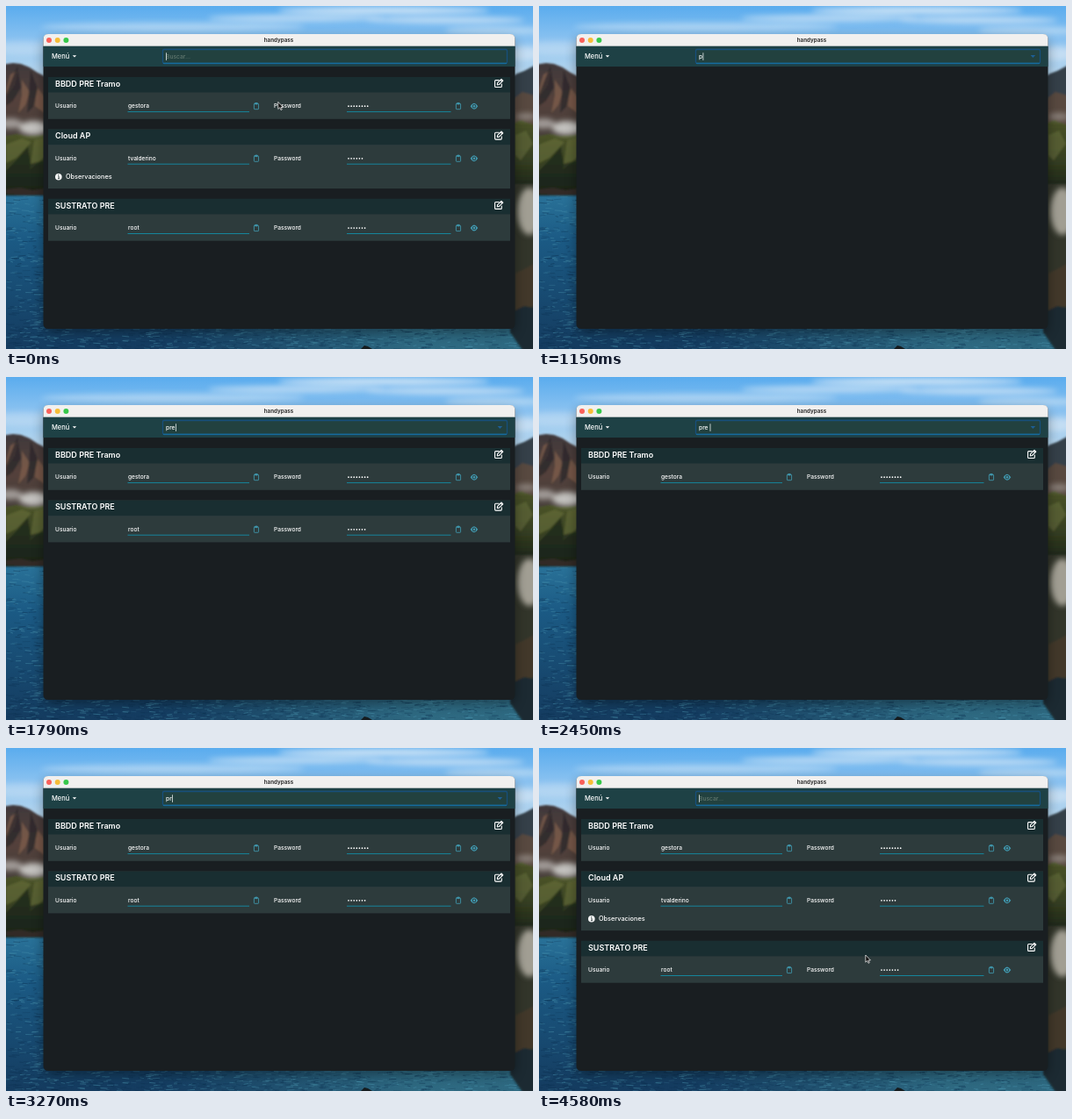
Write an HTML page that moves like this. It is 600 by 391 pixels and loops after 4.61 s.

```html
<!DOCTYPE html>
<html lang="es">
<head>
<meta charset="utf-8">
<title>handypass</title>
<style>
  html, body { margin: 0; width: 100%; height: 100%; overflow: hidden; background: #17191c; }
  svg { display: block; width: 100vw; height: 100vh; font-family: Inter, "Open Sans", sans-serif; }
  text { fill: #fff; white-space: pre; }
  .title { font-size: 9px; font-weight: 600; }
  .label { font-size: 6.6px; font-weight: 500; }
  .line { stroke: #16859b; stroke-width: 1; }
  .icon { fill: none; stroke: #419bb2; stroke-width: .85; stroke-linejoin: round; stroke-linecap: round; }
  .white { stroke: #fff; stroke-width: 1.1; }
</style>
</head>
<body>
<svg viewBox="0 0 600 391" preserveAspectRatio="none">
  <defs>
    <linearGradient id="sky" x2="0" y2="1">
      <stop stop-color="#5aacee"/><stop offset=".16" stop-color="#86c0f0"/><stop offset=".35" stop-color="#b6d6ee"/>
    </linearGradient>
    <linearGradient id="sea" x2="0" y2="1">
      <stop stop-color="#2a7399"/><stop offset=".3" stop-color="#1b5a84"/><stop offset="1" stop-color="#143b5f"/>
    </linearGradient>
    <linearGradient id="shine">
      <stop offset=".3" stop-color="#3f8797" stop-opacity="0"/><stop offset=".78" stop-color="#3f8797" stop-opacity=".6"/>
    </linearGradient>
    <linearGradient id="brown" x2="0" y2="1">
      <stop stop-color="#3f383b"/><stop offset=".5" stop-color="#54413a"/><stop offset="1" stop-color="#48403b"/>
    </linearGradient>
    <linearGradient id="green" x2="0" y2="1">
      <stop stop-color="#4a5329"/><stop offset=".55" stop-color="#363f21"/><stop offset="1" stop-color="#1a2219"/>
    </linearGradient>
    <filter id="soft" x="-50%" y="-50%" width="200%" height="200%"><feGaussianBlur stdDeviation="3"/></filter>
    <filter id="blend"><feGaussianBlur stdDeviation=".9"/></filter>
    <filter id="haze" x="-20%" y="-20%" width="140%" height="140%"><feGaussianBlur stdDeviation="7"/></filter>

    <g id="clip" class="icon">
      <rect x="-2.6" y="-2.9" width="5.2" height="6.4" rx=".7"/>
      <path d="M-1.2 -2.6V-3.7H1.2V-2.6Z" fill="#419bb2"/>
    </g>
    <g id="eye">
      <path d="M-4.3 0Q0 -7 4.3 0Q0 7 -4.3 0Z" fill="#419bb2"/>
      <circle r="2.2" fill="#2d3b3c"/>
      <circle r="1.3" fill="#419bb2"/>
    </g>
    <g id="edit" class="icon white">
      <path d="M.2 -3.5H-3.4Q-4.4 -3.5 -4.400 -2.500V3.400Q-4.400 4.400 -3.400 4.400H2.300Q3.300 4.400 3.300 3.400V1"/>
      <path d="M-1.700 1.800L-1.400 -.4L3 -4.700L4.800 -2.900L.4 1.400Z M2 -3.800L3.800 -2"/>
    </g>
  </defs>

  <g id="landscape">
    <rect width="600" height="220" fill="url(#sky)"/>
    <g fill="#f1f4f8" filter="url(#soft)">
      <ellipse cx="430" cy="5" rx="120" ry="4" opacity=".75"/>
      <ellipse cx="330" cy="14" rx="100" ry="4" opacity=".55"/>
      <ellipse cx="500" cy="16" rx="90" ry="4" opacity=".6"/>
      <ellipse cx="190" cy="24" rx="150" ry="5" opacity=".4"/>
      <ellipse cx="560" cy="28" rx="60" ry="5" opacity=".4"/>
      <ellipse cx="20" cy="48" rx="40" ry="8" opacity=".3"/>
      <ellipse cx="590" cy="54" rx="22" ry="8" opacity=".45"/>
    </g>
    <rect y="213" width="600" height="178" fill="url(#sea)"/>
    <rect y="213" width="600" height="178" fill="url(#shine)"/>
    <g id="ripples" stroke-width=".9"/>

    <g filter="url(#blend)">
      <path d="M-5 67L8 65L17 66L27 70L36 76L50 83V150H-5Z" fill="url(#brown)"/>
      <path d="M5 78L14 73L10 90L0 104V96Z M18 84L27 98L22 113L14 122L18 102Z M35 92L44 104V122L33 114Z" fill="#8a664f" opacity=".6"/>
      <path d="M13 68L17 93L8 108L0 114V101Z M28 73L36 94L31 115L24 122Z" fill="#272529" opacity=".7"/>
      <path d="M-5 149L12 146L24 148L50 146V216H-5Z" fill="url(#green)"/>
      <path d="M0 158L18 151L29 155L12 173L0 179Z M32 153L44 150V172L27 187Z" fill="#69703b" opacity=".6"/>
      <path d="M0 188L15 172L25 160L28 180L44 176V210H0Z" fill="#18221a" opacity=".65"/>
      <path d="M0 209L16 207L30 210L44 208V215L20 216L0 214Z" fill="#302c26"/>

      <path d="M572 83L582 77L590 74L605 66V135H572Z" fill="#35404a"/>
      <path d="M572 110L588 98L605 103V145H572Z" fill="#594a40"/>
      <path d="M572 136L586 130L605 137V212H572Z" fill="url(#green)"/>
      <path d="M580 147L592 142L600 157L586 176L580 170Z" fill="#646b3c" opacity=".6"/>
      <path d="M572 203H605V345L572 352Z" fill="#30352a"/>
      <path d="M580 305L605 292V340L580 350Z" fill="#463a2a" opacity=".8"/>
      <path d="M574 350L590 342L605 345V395H590L574 372Z" fill="#1a2a30"/>
    </g>
    <g fill="#d8d7d5" filter="url(#soft)">
      <ellipse cx="5" cy="134" rx="13" ry="6" opacity=".6"/>
      <ellipse cx="32" cy="139" rx="17" ry="8" opacity=".85"/>
      <ellipse cx="592" cy="126" rx="12" ry="4" opacity=".4"/>
      <ellipse cx="596" cy="234" rx="14" ry="27" fill="#b5b1a6" opacity=".85"/>
    </g>
    <path d="M404 391L408 387L412 388L417 391Z" fill="#151b1e"/>
  </g>

  <rect x="43" y="38" width="536" height="334" rx="6" opacity=".4" filter="url(#haze)"/>
  <rect x="42.5" y="32" width="537" height="336" rx="5.5" fill="#191e21"/>
  <path d="M42.5 46V37.5Q42.5 32 48 32H574Q579.5 32 579.5 37.5V46Z" fill="#f1f0ef"/>
  <circle cx="49" cy="39" r="3" fill="#f9605a"/>
  <circle cx="58.7" cy="39" r="3" fill="#f7bd37"/>
  <circle cx="68.4" cy="39" r="3" fill="#37c84b"/>
  <text x="310.5" y="41.2" text-anchor="middle" font-size="6.2" font-weight="700" style="fill:#333">handypass</text>

  <rect x="42.5" y="45.7" width="537" height="23.4" fill="#1e4145"/>
  <text x="52" y="60.1" font-size="7.5" font-weight="500">Menú</text>
  <path d="M75.8 56.2H80.2L78 58.5Z" fill="#fff"/>
  <rect x="178.5" y="49.5" width="392" height="16" rx="1.5" fill="#22413f" stroke="#174f7c" stroke-width="1.3"/>
  <path d="M179 65.2H570" stroke="#1475a8" stroke-width="1.1"/>
  <text id="query" x="182" y="60.1" font-size="6.7" font-weight="500"></text>
  <rect id="caret" y="53.3" width=".8" height="8.6" fill="#e8eeee"/>
  <path id="clear" d="M559.6 55.9H565.2L562.4 59Z" fill="#1d5f96"/>

  <g id="cards"></g>

  <path id="pointer" d="M0 0V8.2L1.9 6.5L3.2 9.3L4.5 8.7L3.2 6H5.7Z" fill="#111" stroke="#fff" stroke-width=".7"/>
</svg>
<script>
const LOOP = 4610, BLINK = 500, GAP = 11.8;
const $ = id => document.getElementById(id);

const entries = [
  { title: "BBDD PRE Tramo", user: "gestora", dots: 8, height: 47.8 },
  { title: "Cloud AP", user: "tvalderino", dots: 6, height: 67.5, notes: true },
  { title: "SUSTRATO PRE", user: "root", dots: 7, height: 47.8 }
];

const notesRow = `
  <circle cx="59.8" cy="54.2" r="3.8" fill="#fff"/>
  <path d="M59.2 53.4H60.1V56.1M58.9 56.1H61.1" fill="none" stroke="#2d3b3c" stroke-width=".9"/>
  <circle cx="59.8" cy="52" r=".65" fill="#2d3b3c"/>
  <text x="68" y="56.9" font-size="7.3" font-weight="500">Observaciones</text>`;

function card({ title, user, dots, height, notes }) {
  const mask = Array.from({ length: dots }, (_, i) =>
    `<circle cx="${390 + i * 3.1}" cy="33.2" r=".85" fill="#fff"/>`).join("");
  return `<g>
    <rect x="48" width="526" height="${height}" fill="#2d3b3c"/>
    <rect x="48" width="526" height="17.5" fill="#192e31"/>
    <text class="title" x="56" y="10.9">${title}</text>
    <use href="#edit" x="561" y="7.1"/>
    <text class="label" x="56" y="35.4">Usuario</text>
    <text class="label" x="139" y="35.4">${user}</text>
    <path class="line" d="M138.5 39.6H277M388 39.6H506.5"/>
    <text class="label" x="305" y="35.4">Password</text>${mask}
    <use href="#clip" x="285" y="33.2"/>
    <use href="#clip" x="515" y="33.2"/>
    <use href="#eye" x="533" y="33.2"/>
    ${notes ? notesRow : ""}
  </g>`;
}
$("cards").innerHTML = entries.map(card).join("");
const cards = [...$("cards").children];

let seed = 7;
const rand = () => (seed = seed * 16807 % 2147483647) / 2147483647;
function ripple(x, y) {
  const light = rand() < .5;
  return `<path d="M${x} ${y}l${3 + rand() * 6} ${rand() * 2 - 1}" stroke="${light ? "#4a93ae" : "#0c2f4e"}" opacity="${.2 + rand() * .35}"/>`;
}
let waves = "";
for (let i = 0; i < 250; i++) waves += ripple(rand() * 43, 217 + rand() * 174);
for (let i = 0; i < 700; i++) waves += ripple(rand() * 585, 366 + rand() * 25);
$("ripples").innerHTML = waves;

const all = [0, 1, 2], pre = [0, 2];
// start, search text, caret x, visible cards
const steps = [
  [0, "", 182.2, all],
  [1120, "p", 186.5, []],
  [1400, "pr", 189, pre],
  [1600, "pre", 193, pre],
  [2230, "pre ", 194.6, [0]],
  [3060, "pre", 193, pre],
  [3200, "pr", 189, pre],
  [3330, "p", 186.5, pre],
  [3460, "", 182.2, all]
];
// start, end, x, y
const pointerStops = [[0, 1120, 309.8, 109.3], [4480, LOOP, 371.8, 236]];

const show = (el, on) => el.setAttribute("visibility", on ? "visible" : "hidden");
const move = (el, x, y) => el.setAttribute("transform", `translate(${x} ${y})`);
let current = null;

function applyStep([, query, x, visible]) {
  $("query").textContent = query || "Buscar...";
  $("query").style.fill = query ? "#fff" : "#61776f";
  $("caret").setAttribute("x", x);
  show($("clear"), query);
  let y = 81;
  cards.forEach((el, i) => {
    const on = visible.includes(i);
    show(el, on);
    if (!on) return;
    move(el, 0, y);
    y += entries[i].height + GAP;
  });
}

function draw(t) {
  const step = steps.findLast(s => s[0] <= t);
  if (step !== current) applyStep(current = step);
  show($("caret"), Math.floor((t - step[0]) / BLINK) % 2 === 0);
  const stop = pointerStops.find(([from, to]) => t >= from && t < to);
  show($("pointer"), stop);
  if (stop) move($("pointer"), stop[2], stop[3]);
}

const start = performance.now();
function tick() {
  draw((performance.now() - start) % LOOP);
  requestAnimationFrame(tick);
}
tick();
</script>
</body>
</html>
```
